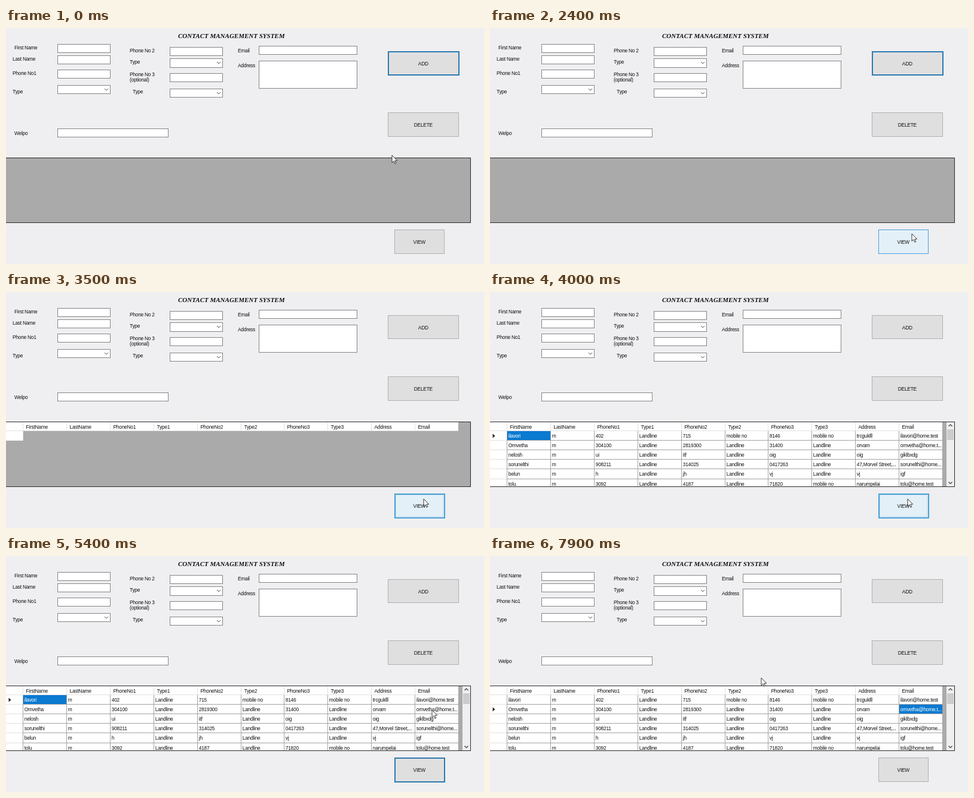
These frames come from a looping animation (800 by 397 pixels, 8 s). An HTML page:

```html
<!DOCTYPE html>
<html lang="en">
<head>
<meta charset="utf-8">
<title>Contact management form</title>
<style>
  html, body { margin: 0; width: 100%; height: 100%; overflow: hidden; background: #efeef0; }
  svg { display: block; width: 800px; height: 397px; }
  rect, line { shape-rendering: crispEdges; }
  text { font: 8.4px "Liberation Sans", Arial, sans-serif; letter-spacing: -.25px; fill: #111; white-space: pre; }
  .title { font: italic bold 11px "Liberation Serif", "Times New Roman", serif; letter-spacing: 0; }
  .mid { text-anchor: middle; }
  .field { fill: #fff; stroke: #858485; }
  .mark { fill: none; stroke: #555; stroke-width: 1; }
  .button { fill: #e0dfe0; stroke: #b0afb0; }
  .focused .button { stroke: #2a7ab0; stroke-width: 2; }
  .hover .button { fill: #e4f0f8; stroke: #45a0d8; }
  .dots { display: none; fill: none; stroke: #a5cce6; stroke-dasharray: 1 1; }
  .hover.focused .dots { display: inline; }
  .light { stroke: #e2e1e2; }
  .rule { stroke: #a3a2a3; }
  .chosen { fill: #0b7ad1; }
  .lit { fill: #fff; }
</style>
</head>
<body>
<svg id="stage" viewBox="0 0 800 397" xmlns="http://www.w3.org/2000/svg"></svg>
<script>
const LOOP = 8000, STEP = 100;
const COL = i => Math.round(28 + i * 72.9) + .5;
const ROW = i => Math.round(234 + i * 16.1) - .5;

const text = (x, y, s, cls = "", id = "") => `<text x="${x}" y="${y}" class="${cls}" id="${id}">${s}</text>`;
const rect = (x, y, w, h, attrs) => `<rect x="${x}" y="${y}" width="${w}" height="${h}" ${attrs}/>`;
const line = (x1, y1, x2, y2, cls) => `<line x1="${x1}" y1="${y1}" x2="${x2}" y2="${y2}" class="${cls}"/>`;
const path = (d, attrs) => `<path d="${d}" ${attrs}/>`;

const field = ([x, y, w, h = 14]) => rect(x + .5, y + .5, w, h, 'class="field"');
const combo = ([x, y, w = 88, h = 14]) =>
  field([x, y, w, h]) + path(`M${x + w - 9} ${y + 6}l3 3 3-3`, 'class="mark"');
const button = (id, x, y, w, h, label) => `<g id="${id}">
  ${rect(x + .5, y + .5, w, h, 'class="button"')}
  ${rect(x + 2.5, y + 2.5, w - 4, h - 4, 'class="dots"')}
  ${text(x + w / 2 + .3, y + h / 2 + 4, label, "mid")}</g>`;

const labels = [
  [14, 35.5, "First Name"], [11, 54.5, "Last Name"], [11, 78.5, "Phone No1"], [11, 110, "Type"],
  [207, 40.5, "Phone No 2"], [207, 59.5, "Type"], [207, 80.5, "Phone No 3"], [207, 90, "(optional)"],
  [212, 110, "Type"], [388, 40.5, "Email"], [388, 65.5, "Address"], [14, 179.5, "Welpo"]
];
const fields = [
  [86, 27, 88], [86, 46, 88], [86, 70, 88], [274, 32, 88], [274, 76, 88],
  [423, 30, 164], [423, 55, 164, 46], [86, 169, 185]
];
const combos = [[86, 96], [274, 51, 88, 15], [274, 102]];

const heads = "FirstName LastName PhoneNo1 Type1 PhoneNo2 Type2 PhoneNo3 Type3 Address Email".split(" ");
const L = "Landline", M = "mobile no";
const people = [
  ["ilavori", "m", "402", L, "715", M, "8146", M, "trcguklll", "ilavori@home.test"],
  ["Omvetha", "m", "304100", L, "2819300", L, "31400", L, "orvam", "omvetha@home.t..."],
  ["nelosh", "m", "ui", L, "itf", L, "oig", L, "oig", "giklbxdg"],
  ["sorunelthi", "m", "908211", L, "314025", L, "0417263", L, "47,Morvel Street,...", "sorunelthi@home..."],
  ["belun", "m", "h", L, "jh", L, "vj", L, "vj", "igf"],
  ["tolu", "m", "3092", L, "4187", L, "71820", M, "narumpelai", "tolu@home.test"]
];

const headerRow = () =>
  rect(0, 219, 757, 15, 'fill="#fff"') +
  heads.map((h, i) => line(COL(i), 219, COL(i), 234, "light") + text(COL(i) + 5, 229.7, h)).join("") +
  line(0, ROW(0), 757, ROW(0), "light");

const scrollBar = () =>
  rect(764, 219, 13, 108, 'fill="#f0eff0"') +
  rect(765, 231, 11, 18, 'fill="#cdcccd"') +
  path("M767.5 226l3-3 3 3M767.5 319.5l3 3 3-3", 'class="mark" style="stroke-width:1.5"');

const dataRows = () => {
  let out = rect(0, 234, 757, 93, 'fill="#fff"') + rect(0, 0, 72, 15, 'id="chosen" class="chosen"');
  for (let i = 1; i <= 5; i++) {
    out += line(0, ROW(i), 28, ROW(i), "light") + line(28, ROW(i), 757, ROW(i), "rule");
  }
  for (let i = 0; i <= 10; i++) out += line(COL(i), 234, COL(i), 327, "rule");
  people.forEach((cells, r) => cells.forEach((s, c) => {
    out += text(COL(c) + 2.3, ROW(r) + 11.4, s, "", `cell${r}-${c}`);
  }));
  return out + path("M4.5 0v7l4-3.5z", 'id="pointer" fill="#222"') + scrollBar();
};

const stage = document.getElementById("stage");
stage.innerHTML =
  `<clipPath id="inside"><rect x="0" y="219" width="777" height="108"/></clipPath>` +
  rect(0, 0, 800, 397, 'fill="#efeef0"') +
  text(288, 17, "CONTACT MANAGEMENT SYSTEM", "title") +
  labels.map(a => text(...a)).join("") +
  fields.map(field).join("") + combos.map(combo).join("") +
  button("add", 639, 39, 118, 39, "ADD") +
  button("delete", 639, 142, 118, 40, "DELETE") +
  button("view", 650, 339, 83, 40, "VIEW") +
  rect(-2, 218, 779, 109, 'fill="#abaaab"') +
  `<g clip-path="url(#inside)">
    <g id="head">${headerRow()}${rect(0, 234, 28, 16, 'fill="#fff"')}${line(28.5, 219, 28.5, 250, "light")}</g>
    <g id="data">${dataRows()}</g></g>` +
  rect(-2.5, 218.5, 780, 109, 'fill="none" stroke="#2b2a2b"') +
  path("M0 0v12.5l2.9-2.7 2 4.5 1.9-.9-2-4.3h3.8z", 'id="cursor" fill="#fff" stroke="#222" stroke-width=".9"');

const $ = id => document.getElementById(id);
const show = (id, on) => $(id).style.display = on ? "" : "none";

// time, x, y of the pointer tip
const trail = [
  [0, 646, 214], [700, 694, 238], [900, 694, 238], [1300, 732, 269], [1400, 732, 269],
  [2000, 708, 345], [2400, 706, 346], [3000, 699, 348], [4300, 699, 348],
  [5000, 713, 259], [6200, 713, 259], [7500, 454, 205], [LOOP, 454, 205]
];

function pointerAt(t) {
  const i = trail.findIndex(p => p[0] > t);
  const [t0, x0, y0] = trail[i - 1], [t1, x1, y1] = trail[i];
  const u = (t - t0) / (t1 - t0), k = u * u * (3 - 2 * u);
  return [x0 + (x1 - x0) * k, y0 + (y1 - y0) * k];
}

function draw(t) {
  const [x, y] = pointerAt(t);
  $("cursor").setAttribute("transform", `translate(${x.toFixed(1)} ${y.toFixed(1)})`);

  const viewClicked = t >= 3100, cellClicked = t >= 6000;
  $("add").classList.toggle("focused", !viewClicked);
  $("view").classList.toggle("focused", viewClicked && !cellClicked);
  $("view").classList.toggle("hover", x > 650 && x < 733 && y > 339 && y < 379);
  show("head", t >= 3400);
  show("data", t >= 3600);

  const [r, c] = cellClicked ? [1, 9] : [0, 0];
  $("chosen").setAttribute("x", COL(c) + .5);
  $("chosen").setAttribute("y", ROW(r) + .5);
  $("pointer").setAttribute("transform", `translate(0 ${ROW(r) + 5})`);
  $("cell0-0").classList.toggle("lit", !cellClicked);
  $("cell1-9").classList.toggle("lit", cellClicked);
}

const start = performance.now();
function tick() {
  const t = (performance.now() - start) % LOOP;
  draw(Math.floor(t / STEP) * STEP);
  requestAnimationFrame(tick);
}
tick();
</script>
</body>
</html>
```
